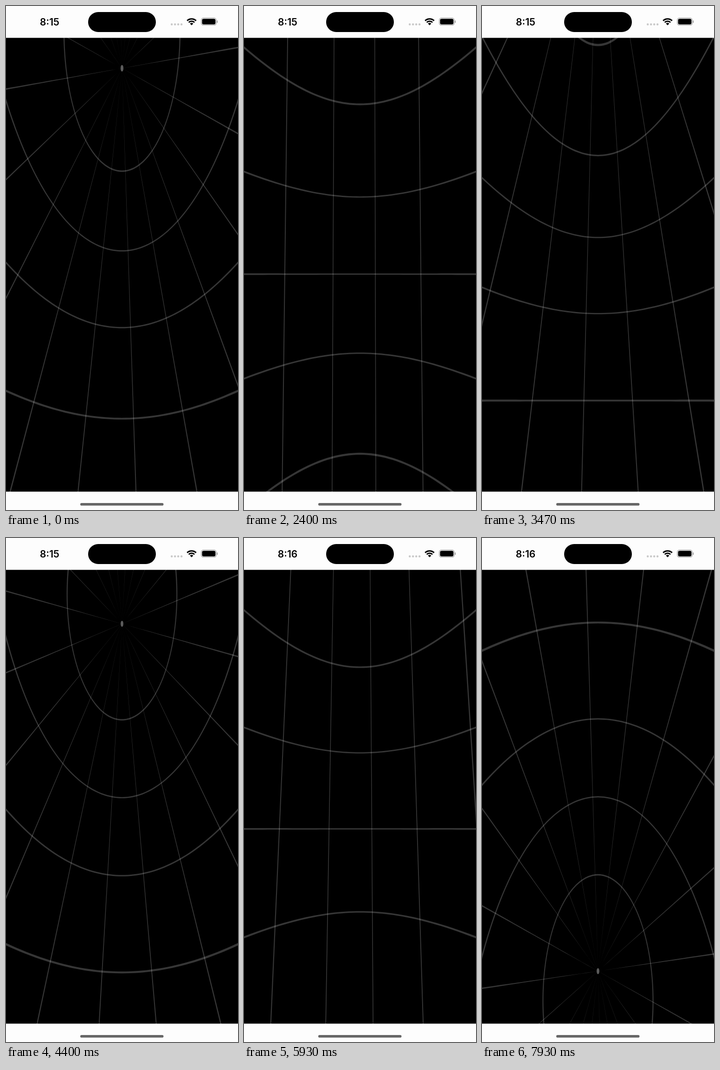
An HTML page with a canvas that plays this animation: 500x1084 px, repeating every 8 s.

```html
<!DOCTYPE html>
<html lang="en">
<head>
<meta charset="utf-8">
<title>Sphere grid</title>
<style>
  html, body { margin: 0; width: 100%; height: 100%; overflow: hidden; background: #fdfdfd; }
  canvas { display: block; width: 500px; height: 1084px; }
</style>
</head>
<body>
<canvas id="stage"></canvas>
<script>
const W = 500, H = 1084, LOOP = 8000, STEP = 200 / 3;
const VIEW = { top: 68.5, bottom: 1044.5, cx: 250, cy: 556.7, fx: 287, fy: 516 };
const PAPER = '#fdfdfd', INK = '#000', LINE = 'rgba(255,255,255,.21)';
const RAD = Math.PI / 180, GRID = 18, HALF = 0.15, NEAR = 0.2;

// Camera keys: step, pitch up, meridian offset (degrees)
const KEYS = [
  [0, 50.67, 4.4], [29, 50.67, 4.4], [36, 2.22, 6.56], [41, -24, 9],
  [52, 29.5, 12.73], [66, 54.2, 10.76], [75, 28.2, 7.47], [88, 9, 5],
  [101, -8.8, 7.76], [119, -54, 14.2], [120, -55.5, 14.4]
];

const canvas = document.getElementById('stage');
const ctx = canvas.getContext('2d');
const dpr = window.devicePixelRatio || 1;
canvas.width = W * dpr;
canvas.height = H * dpr;

function slope(i, col) {
  const a = KEYS[i - 1], b = KEYS[i], c = KEYS[i + 1];
  if (!a || !c) return 0;
  const m = (b[col] - a[col]) / (b[0] - a[0]);
  const n = (c[col] - b[col]) / (c[0] - b[0]);
  return m * n > 0 ? 2 * m * n / (m + n) : 0;
}

// Monotone cubic interpolation between keys
function track(s, col) {
  let i = 0;
  while (i < KEYS.length - 2 && s >= KEYS[i + 1][0]) i++;
  const a = KEYS[i], b = KEYS[i + 1], d = b[0] - a[0];
  const u = (s - a[0]) / d, v = 1 - u;
  return a[col] * (1 + 2 * u) * v * v + b[col] * u * u * (3 - 2 * u)
    + d * u * v * (slope(i, col) * v - slope(i + 1, col) * u);
}

function project(lat, lon, pitch) {
  const la = lat * RAD, lo = lon * RAD, p = pitch * RAD;
  const x = Math.cos(la) * Math.sin(lo), y = Math.sin(la);
  const f = Math.cos(la) * Math.cos(lo);
  const z = f * Math.cos(p) + y * Math.sin(p);
  const up = y * Math.cos(p) - f * Math.sin(p);
  return { x: VIEW.cx + VIEW.fx * x / z, y: VIEW.cy - VIEW.fy * up / z, z };
}

function fillPoly(points, color) {
  if (points.length < 3) return;
  ctx.beginPath();
  points.forEach(p => ctx.lineTo(p.x, p.y));
  ctx.closePath();
  ctx.fillStyle = color;
  ctx.fill();
}

// at(t, side) gives the point on a band's centre (0) or edge (-1, 1)
function band(from, to, step, at) {
  const one = [], two = [];
  for (let t = from; t <= to; t += step) {
    if (at(t, 0).z < NEAR) continue;
    one.push(at(t, -1));
    two.push(at(t, 1));
  }
  fillPoly(one.concat(two.reverse()), LINE);
}

function drawGrid(pitch, offset) {
  for (let lat = -72; lat <= 72; lat += GRID)
    band(-180, 180, 1.5, (lon, side) => project(lat + side * HALF, lon, pitch));
  for (let k = -10; k < 10; k++) {
    const lon = offset + k * GRID;
    band(-90, 90, 2, (lat, side) => project(lat, lon + side * HALF, pitch));
  }
  const pole = pitch > 0 ? 89.53 : -89.53;
  const cap = [];
  for (let lon = 0; lon < 360; lon += 20) cap.push(project(pole, lon, pitch));
  if (cap.every(p => p.z > NEAR)) fillPoly(cap, '#5c5c5c');
}

function pill(x, y, w, h, r, color) {
  ctx.beginPath();
  ctx.roundRect(x, y, w, h, r);
  ctx.fillStyle = color;
  ctx.fill();
}

function drawWifi(x, y) {
  const a = -Math.PI / 2, spread = 0.78;
  ctx.strokeStyle = ctx.fillStyle = INK;
  ctx.lineWidth = 3;
  for (const r of [13.8, 8.8]) {
    ctx.beginPath();
    ctx.arc(x, y, r, a - spread, a + spread);
    ctx.stroke();
  }
  ctx.beginPath();
  ctx.moveTo(x, y);
  ctx.arc(x, y, 5.2, a - spread, a + spread);
  ctx.fill();
}

function drawBars(clock) {
  ctx.fillStyle = PAPER;
  ctx.fillRect(0, 0, W, VIEW.top);
  ctx.fillRect(0, VIEW.bottom, W, H - VIEW.bottom);

  ctx.fillStyle = INK;
  ctx.font = '600 21px Inter, sans-serif';
  ctx.textAlign = 'center';
  ctx.fillText(clock, 94, 42);
  pill(177, 13, 146, 43, 21.5, INK);

  for (let i = 0; i < 4; i++) pill(355 + i * 7, 37.3, 4.4, 4.4, 2.2, '#c8c8c8');
  drawWifi(400, 41.5);

  ctx.beginPath();
  ctx.roundRect(420.7, 25.7, 32.6, 15.8, 5);
  ctx.strokeStyle = '#a5a5a5';
  ctx.lineWidth = 1.2;
  ctx.stroke();
  pill(422.5, 27.5, 29, 12.2, 3.4, INK);
  pill(454.3, 31, 2, 5.4, 1, '#a5a5a5');

  pill(160, 1069, 179.5, 5.6, 2.8, '#666');
}

function draw(now) {
  const time = now % LOOP;
  const s = Math.floor((time + 5) / STEP) % 120;
  ctx.setTransform(dpr, 0, 0, dpr, 0, 0);
  ctx.fillStyle = INK;
  ctx.fillRect(0, 0, W, H);
  drawGrid(track(s, 1), track(s, 2));
  drawBars(time < 4700 ? '8:15' : '8:16');
  requestAnimationFrame(draw);
}

draw(0);
</script>
</body>
</html>
```
